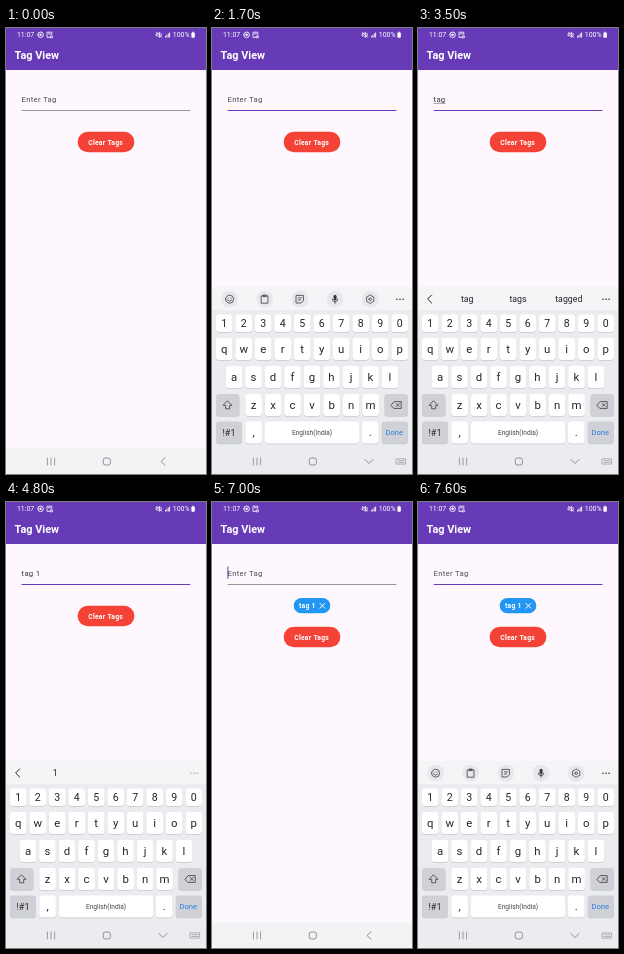
An HTML page with a canvas that plays this animation: 200 by 446 pixels, repeating every 8 s.

```html
<!DOCTYPE html>
<html lang="en">
<head>
<meta charset="utf-8">
<title>Tag View</title>
<style>
html, body { margin: 0; width: 100%; height: 100%; overflow: hidden; background: #fef8fe; }
canvas { display: block; width: 200px; height: 446px; }
</style>
</head>
<body>
<canvas id="stage"></canvas>
<script>
const canvas = document.getElementById('stage');
const ctx = canvas.getContext('2d');
const scale = Math.max(1, window.devicePixelRatio || 1);
canvas.width = 200 * scale;
canvas.height = 446 * scale;

const LOOP = 8000, STEP = 100;
const PURPLE = '#673ab7', INK = '#25262a';

// Timed states: [start, value]
const typed = [[0, ''], [2000, 't'], [2700, 'ta'], [2900, 'tag'], [3700, 'tag '], [4200, 'tag 1'], [5100, '']];
const words = [
  [0, []], [2300, ['t', 'test', 'testing']], [2800, ['ta', 'tag', 'take']],
  [3200, ['tag', 'tags', 'tagged']], [3800, ['is', 'the', 'and']], [4500, ['1']]
];
const cursorOn = [[700, 1700], [2000, 2500], [2700, 3400], [3700, 4800], [7000, 7600]];
const focusOn = [[1200, 5100], [7200, LOOP]];
const navOpen = [[800, 5300], [7100, LOOP]];
const presses = [['t', 2000], ['a', 2600], ['g', 2900], ['space', 3600], ['1', 4200]];

const at = (list, t) => list.filter(e => e[0] <= t).pop()[1];
const within = (spans, t) => spans.some(([a, b]) => t >= a && t < b);
const ramp = (t, a, b) => Math.min(1, Math.max(0, (t - a) / (b - a)));

function text(s, x, y, size, color, { align = 'left', weight = 400, spacing = 0 } = {}) {
  ctx.font = `${weight} ${size}px Roboto, sans-serif`;
  ctx.letterSpacing = spacing + 'px';
  ctx.textAlign = align;
  ctx.fillStyle = color;
  ctx.fillText(s, x, y);
}

function rect(x, y, w, h, color, r = 0) {
  ctx.fillStyle = color;
  ctx.beginPath();
  ctx.roundRect(x, y, w, h, r);
  ctx.fill();
}

function dot(x, y, r, color) {
  rect(x - r, y - r, 2 * r, 2 * r, color, r);
}

// Strokes an SVG path around the point x, y
function icon(d, x, y, color = '#3a3b40', width = 0.8) {
  ctx.save();
  ctx.translate(x, y);
  ctx.strokeStyle = color;
  ctx.lineWidth = width;
  ctx.lineCap = ctx.lineJoin = 'round';
  ctx.stroke(new Path2D(d));
  ctx.restore();
}

const circle = r => `M${-r} 0a${r} ${r} 0 1 0 ${2 * r} 0a${r} ${r} 0 1 0 ${-2 * r} 0`;

function drawHeader() {
  rect(0, 0, 200, 42, PURPLE);
  text('11:07', 11, 9.4, 6.9, '#fff');
  icon(circle(2.8), 34.6, 6.8, '#fff', 0.9);
  dot(34.6, 6.8, 1.2, '#fff');
  icon('M2.4 0V-2.6H-2.4V2.6H0M-1 -1H1M1 1.2H3V3H1Z', 43.4, 6.8, '#fff');
  icon('M-2.6 -1H-1.2L.6 -2.5V2.5L-1.2 1H-2.6ZM2 -1.5Q3 0 2 1.5M-2.5 -2.5L2.5 2.5', 153, 6.8, '#fff');
  for (let i = 0; i < 4; i++) rect(159 + i * 1.4, 8 - i * 1.2, 0.9, 1.5 + i * 1.2, '#fff');
  text('100%', 166.7, 9.4, 7, '#fff');
  rect(185.4, 4.5, 3.4, 5.2, '#fff', 0.7);
  rect(186.4, 3.7, 1.4, 1, '#fff');
  text('Tag View', 8.6, 31.3, 10.9, '#fff', { weight: 700 });
}

function drawForm(t) {
  const value = at(typed, t), style = { spacing: 0.24 };
  if (value) text(value, 15.6, 73.6, 7.8, '#3c3940', style);
  else text('Enter Tag', 15.6, 73.6, 7.8, '#4f4b55', style);
  const width = value ? ctx.measureText(value).width : 0;
  if (value && !/ /.test(value)) rect(15.6, 74.9, width, 0.5, '#3c3940');
  if (within(cursorOn, t)) rect(15.4 + width, 64.5, 1, 12.3, PURPLE);
  if (within(focusOn, t)) rect(15.6, 82, 168.8, 1, PURPLE);
  else rect(15.6, 82.1, 168.8, 0.6, '#79757f');

  const tagged = t >= 5100;
  const bold = { weight: 700, spacing: 0.24 };
  if (tagged) {
    rect(81.7, 96, 36.6, 15.3, '#2196f3', 7.6);
    text('tag 1', 87, 106.2, 6.8, '#fff', bold);
    icon('M-2.4 -2.4L2.4 2.4M2.4 -2.4L-2.4 2.4', 110.4, 103.8, '#fff', 1);
  }
  const y = tagged ? 124.8 : 103.8;
  rect(71.6, y, 56.8, 20.4, '#f44336', 10.2);
  text('Clear Tags', 82.2, y + 12.7, 6.8, '#fff', bold);
}

// Each key: label, centre x, centre y, width, height, dark
const keys = [];
function addRow(labels, x, y, h) {
  [...labels].forEach((c, i) => keys.push([c, x + i * 19.5, y, 16.6, h]));
}
addRow('1234567890', 12.2, 295.3, 17.6);
addRow('qwertyuiop', 12.2, 321, 22);
addRow('asdfghjkl', 22, 349, 22);
addRow('zxcvbnm', 41.6, 377, 22);
keys.push(['shift', 15.7, 377, 23.4, 22, 1], ['delete', 184.2, 377, 23.4, 22, 1],
  ['!#1', 17, 404.6, 26, 22, 1], [',', 41.6, 404.6, 16.6, 22], ['space', 100, 404.6, 94, 22],
  ['.', 158.2, 404.6, 16.6, 22], ['Done', 182.8, 404.6, 26, 22, 1]);

function drawKey([label, x, y, w, h, dark], pressed) {
  const left = x - w / 2, top = y - h / 2, mid = { align: 'center' };
  rect(left, top + 0.7, w, h, '#c5c8cd', 3);
  rect(left, top, w, h, pressed && h > 20 ? '#dcdee2' : dark ? '#cfd1d6' : '#fff', 3);
  if (label === 'shift') icon('M0 -4L4.2 .3H2V3.8H-2V.3H-4.2Z', x, y);
  else if (label === 'delete') icon('M-5 0L-2 -3.4H5V3.4H-2ZM0 -1.5L3 1.5M3 -1.5L0 1.5', x, y);
  else if (label === 'space') text('English(India)', x, y + 2.2, 6.6, '#46484d', mid);
  else if (label === 'Done') text(label, x - 0.5, y + 2.7, 7.6, '#2b7de0', mid);
  else if (label === '!#1') text(label, x, y + 3.2, 9, INK, mid);
  else text(label, x, y + (h < 20 ? 3.7 : 3.6), h < 20 ? 10.6 : 11.4, INK, mid);
}

function drawPreview([label, x, y, w, h]) {
  const top = y - h / 2 - 23;
  rect(x - w / 2, top + 0.7, w, 20, '#c5c8cd', 3);
  rect(x - w / 2, top, w, 20, '#fff', 3);
  text(label, x, top + 14, 12, INK, { align: 'center' });
}

const tools = [
  circle(4) + 'M-2 1Q0 3.2 2 1M-1.4 -1.2V-1M1.4 -1.2V-1',
  'M-3.2 -3.3H3.2V4H-3.2ZM-1.3 -4.2H1.3V-2.6H-1.3Z',
  'M-3.5 -3.8H3.5V1.5L1.3 3.8H-3.5ZM-1.6 -1.3H1.6M-1.6 .8H.6',
  'M0 -3V0M-2.8 0Q-2.5 2.5 0 2.5Q2.5 2.5 2.8 0M0 2.5V4.2',
  circle(1.3) + 'M0 -4.2L1.6 -3.2L3.6 -2.1V2.1L1.6 3.2L0 4.2L-1.6 3.2L-3.6 2.1V-2.1L-1.6 -3.2Z'
];

function drawToolbar(t) {
  const listing = t >= 2300 && t < 7000;
  ctx.globalAlpha = t >= 2000 && t < 2300 ? 1 - ramp(t, 2000, 2300) : 1;
  if (!listing) tools.forEach((d, i) => {
    const x = 17.6 + i * 35.15;
    dot(x, 271.2, 8.4, '#e7e8eb');
    icon(d, x, 271.2);
    if (i === 3) rect(x - 1.5, 266.8, 3, 5.6, '#3a3b40', 1.5);
  });
  if (listing) {
    ctx.globalAlpha = t < 4500 ? 0.4 + 0.6 * ramp(t, 2300, 2500) : 0.4 + 0.6 * ramp(t, 4500, 4700);
    icon('M2 -4L-2 0L2 4', 11.6, 271, INK, 1);
    at(words, t).forEach((w, i) => text(w, 49.2 + i * 50.8, 274, 8.8, INK, { align: 'center' }));
  }
  ctx.globalAlpha = listing ? 1 - 0.65 * ramp(t, 4500, 4800) : 1;
  for (let i = -1; i < 2; i++) dot(188 + i * 3.1, 271.2, 0.8, INK);
  ctx.globalAlpha = 1;
}

// Distance of the keyboard below its resting place
function keyboardOffset(t) {
  if (t >= 5100 && t < 7000) {
    const p = ramp(t, 5100, 5600);
    return 186 * p * p * (3 - 2 * p);
  }
  const since = t - (t < 5100 ? 700 : 7000);
  return Math.min(186, Math.max(0, 47.4 * Math.exp((300 - since) / 84) - 1.4));
}

function drawKeyboard(t) {
  const offset = keyboardOffset(t);
  if (offset >= 186) return;
  ctx.save();
  ctx.translate(0, offset);
  rect(0, 259.5, 200, 190, '#ebecef');
  rect(0, 259.5, 200, 22.5, '#f5f5f7');
  drawToolbar(t);
  const press = presses.find(p => t >= p[1] && t < p[1] + 100);
  keys.forEach(k => drawKey(k, press && press[0] === k[0]));
  if (press && press[0] !== 'space') drawPreview(keys.find(k => k[0] === press[0]));
  ctx.restore();
}

function drawNav(t) {
  const gray = '#85868b';
  icon('M-3.6 -3.5V3.5M0 -3.5V3.5M3.6 -3.5V3.5', 45, 433.5, gray);
  ctx.strokeStyle = gray;
  ctx.lineWidth = 0.9;
  ctx.beginPath();
  ctx.roundRect(97.2, 430, 7.2, 7, 2.2);
  ctx.stroke();
  if (within(navOpen, t)) {
    icon('M-4 -2L0 2L4 -2', 157, 433.5, gray, 0.9);
    icon('M-4.6 -2.6H4.6V2.6H-4.6ZM-3 -.8H3M-3 1H3', 189, 433.5, gray, 0.6);
  } else {
    icon('M2 -3.7L-2 0L2 3.7', 157, 433.5, gray, 0.9);
  }
}

function draw(now) {
  const t = Math.floor((now % LOOP) / STEP) * STEP;
  ctx.setTransform(scale, 0, 0, scale, 0, 0);
  rect(0, 0, 200, 446, '#fef8fe');
  drawHeader();
  drawForm(t);
  rect(0, 420.5, 200, 26, '#f3f2f4');
  drawKeyboard(t);
  drawNav(t);
}

let start;
function frame(now) {
  start ??= now;
  draw(now - start);
  requestAnimationFrame(frame);
}
draw(0);
requestAnimationFrame(frame);
</script>
</body>
</html>
```
